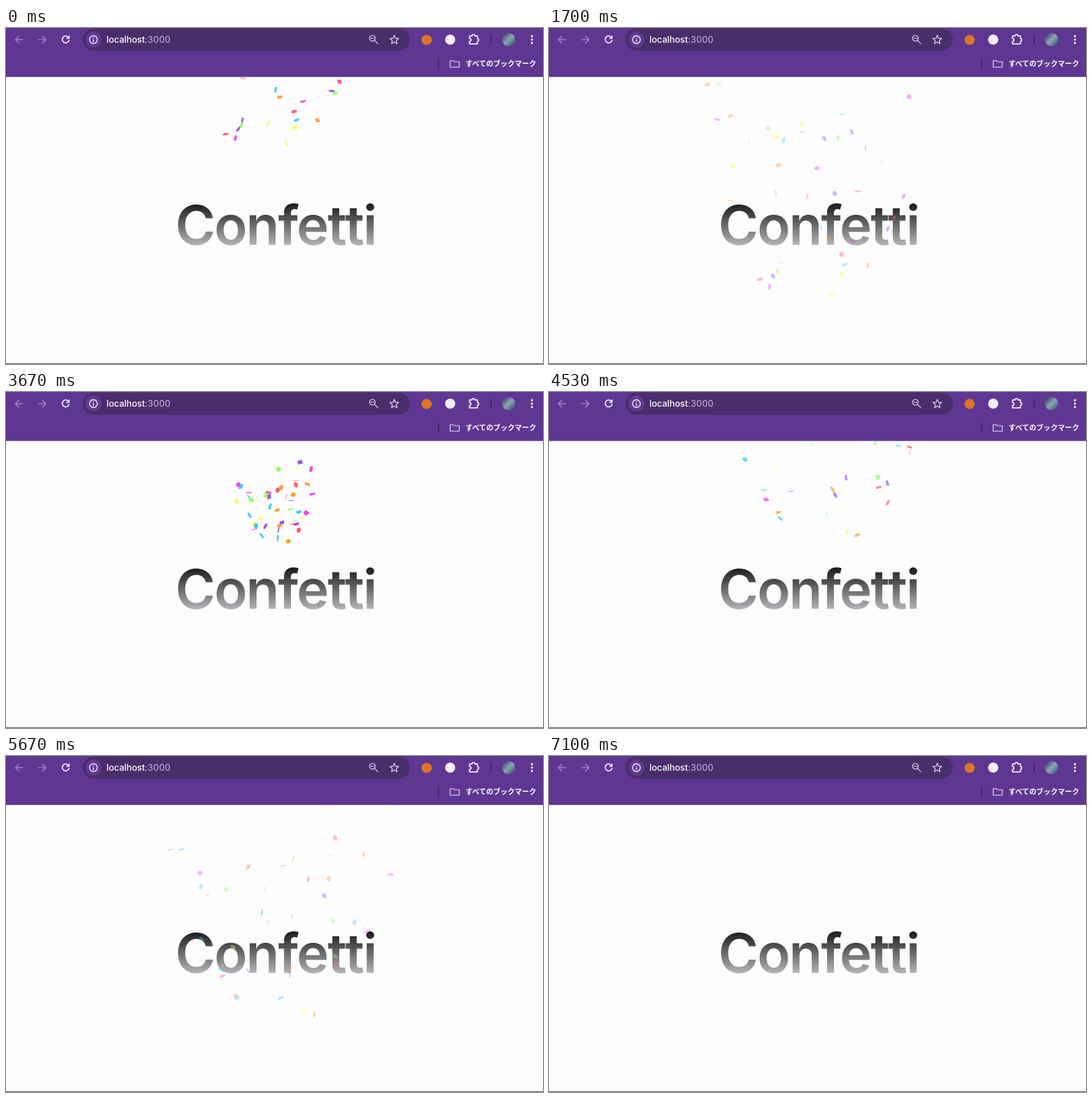
Write an HTML page with a canvas that moves like this. It is 946 px wide and 592 px high and loops after 7.13 s.

```html
<!DOCTYPE html>
<html lang="ja">
<head>
<meta charset="utf-8">
<title>Confetti</title>
<style>
  html, body { margin: 0; width: 100%; height: 100%; overflow: hidden; background: #fdfdfd; }
  svg, canvas { position: absolute; left: 0; top: 0; display: block; }
  .icon { fill: none; stroke: #f4effa; stroke-width: 2; stroke-linecap: round; stroke-linejoin: round; }
  .dim { stroke: #9a7fbe; }
  .soft { stroke: #cfc3de; }
  .thin { stroke-width: 1.7; }
  .url { font: 500 15.6px Inter, "Open Sans", sans-serif; fill: #fff; }
  .port { font-weight: 400; fill: #cbbddd; letter-spacing: .3px; }
  .marks { font: 700 12.6px "Noto Sans CJK JP", "Noto Sans CJK", sans-serif; fill: #fff; }
  .title {
    font: 600 96px Inter, "Liberation Sans", sans-serif;
    font-optical-sizing: none;
    letter-spacing: -2.3px;
    text-anchor: middle;
    fill: url(#fade);
  }
</style>
</head>
<body>
<svg width="946" height="592" viewBox="0 0 946 592">
  <defs>
    <linearGradient id="fade" gradientUnits="userSpaceOnUse" x1="0" y1="310" x2="0" y2="383">
      <stop offset="0" stop-color="#1c1c1e"/>
      <stop offset="1" stop-color="#b3b5b8"/>
    </linearGradient>
    <linearGradient id="avatar" x1="0" y1="0" x2="1" y2="1">
      <stop offset="0" stop-color="#26345c"/>
      <stop offset=".5" stop-color="#8fa3b5"/>
      <stop offset="1" stop-color="#27406f"/>
    </linearGradient>
  </defs>

  <rect width="946" height="87" fill="#cfc5db"/>
  <rect width="946" height="86" fill="#5f3792"/>
  <rect x="135" y="1" width="576.5" height="39" rx="19.5" fill="#4a2d6b"/>
  <circle cx="154" cy="20.5" r="14" fill="#613a94"/>

  <g class="icon">
    <path class="dim" d="M29.5 20.5H17M22.5 14.5L16.5 20.5L22.5 26.5"/>
    <path class="dim" d="M57.5 20.5H70M64.5 14.5L70.5 20.5L64.5 26.5"/>
    <path d="M110.5 17.3A6 6 0 1 0 111 21.7M111 14.2V18.2H107"/>
    <g class="thin">
      <circle cx="154" cy="20.5" r="6.8"/>
      <path d="M154 20.3V23.8M154 17.2V17.3"/>
    </g>
    <g class="soft thin">
      <circle cx="645.5" cy="18" r="5"/>
      <path d="M649.3 21.8L655 27.5M643.3 18H647.7"/>
      <path id="star"/>
      <path d="M782.5 57.5H788L790 59.5H798.5V69H782.5Z"/>
    </g>
    <path d="M816.5 14H821C821 10.8 826 10.8 826 14H830.5V18.5C833.5 18.5 833.5 23.5 830.5 23.5V28H816.5V23.8C820 23.5 820 18.5 816.5 18.2Z"/>
  </g>

  <circle cx="741" cy="21" r="9" fill="#dd7428"/>
  <circle cx="782.5" cy="20.5" r="9" fill="#f4effa"/>
  <circle cx="885.5" cy="20.5" r="11.5" fill="url(#avatar)"/>
  <path d="M854.5 12V29M762 54.5V72" stroke="#3c2260" stroke-width="2"/>
  <path d="M926.5 14.5V27" stroke="#f4effa" stroke-width="3.8" stroke-linecap="round" stroke-dasharray="0 6"/>

  <text class="url" x="177" y="26">localhost<tspan class="port">:3000</tspan></text>
  <text class="marks" x="809.5" y="67">すべてのブックマーク</text>
  <text class="title" x="475" y="381.5">Confetti</text>
  <rect y="590.5" width="946" height="1.5" fill="#77757a"/>
</svg>
<canvas id="stage" width="946" height="592"></canvas>

<script>
const LOOP = 7130, TICK = 1000 / 60, LIFE = 200;
const PIECES = 50, SPEED = 45, SPREAD = Math.PI / 4;
const GRAVITY = 3, DECAY = 0.9;
const ORIGIN = { x: 473, y: 339 };
const COLORS = [
  '60,200,250', '155,85,230', '247,92,122', '145,255,100',
  '253,252,85', '252,158,55', '242,65,245'
];

function seeded(seed) {
  return () => {
    seed = (seed + 0x6D2B79F5) | 0;
    let v = Math.imul(seed ^ (seed >>> 15), seed | 1);
    v ^= v + Math.imul(v ^ (v >>> 7), v | 61);
    return ((v ^ (v >>> 14)) >>> 0) / 4294967296;
  };
}

function makePieces(seed) {
  const rand = seeded(seed);
  return Array.from({ length: PIECES }, (_, i) => {
    const angle = (rand() - 0.5) * SPREAD - Math.PI / 2;
    // Total way a slowing piece covers: the sum of a geometric series.
    const way = SPEED * (0.5 + rand()) / (1 - DECAY);
    return {
      dx: way * Math.cos(angle),
      dy: way * Math.sin(angle),
      rgb: COLORS[i % COLORS.length],
      round: rand() < 0.5,
      wobble: rand() * 10,
      wobbleSpeed: Math.min(0.11, rand() * 0.1 + 0.05),
      tilt: (rand() * 0.5 + 0.25) * Math.PI,
      size: 2 + rand()
    };
  });
}

const bursts = [
  { start: -280, pieces: makePieces(11) },
  { start: 3595, pieces: makePieces(29) }
];

const ctx = document.getElementById('stage').getContext('2d');

function drawPiece(p, tick) {
  const reach = 1 - DECAY ** tick;
  const x = ORIGIN.x + p.dx * reach;
  const y = ORIGIN.y + p.dy * reach + GRAVITY * tick;
  const w = p.wobble + p.wobbleSpeed * tick;
  const wx = 10 * Math.cos(w), wy = 10 * Math.sin(w);

  ctx.fillStyle = `rgba(${p.rgb},${1 - tick / LIFE})`;
  ctx.beginPath();
  if (p.round) {
    ctx.ellipse(x, y, Math.abs(wx) * 0.6, Math.abs(wy) * 0.6, w * Math.PI / 10, 0, Math.PI * 2);
  } else {
    const tilt = p.tilt + 0.1 * tick;
    const tx = p.size * Math.cos(tilt), ty = p.size * Math.sin(tilt);
    const corner = (a, b) => ctx.lineTo(Math.floor(x + a), Math.floor(y + b));
    corner(0, 0);
    corner(wx, ty);
    corner(wx + tx, wy + ty);
    corner(tx, wy);
    ctx.closePath();
  }
  ctx.fill();
}

function draw(time) {
  ctx.clearRect(0, 0, 946, 592);
  ctx.save();
  ctx.beginPath();
  ctx.rect(0, 87, 946, 503.5);
  ctx.clip();
  for (const { start, pieces } of bursts) {
    const tick = Math.floor((time - start) / TICK);
    if (tick > 0 && tick < LIFE) pieces.forEach(p => drawPiece(p, tick));
  }
  ctx.restore();
}

function starPath(cx, cy, outer, inner) {
  let d = '';
  for (let i = 0; i < 10; i++) {
    const r = i % 2 ? inner : outer, a = i * Math.PI / 5 - Math.PI / 2;
    d += `${i ? 'L' : 'M'}${cx + r * Math.cos(a)} ${cy + r * Math.sin(a)}`;
  }
  return d + 'Z';
}
document.getElementById('star').setAttribute('d', starPath(684, 21, 8.3, 3.6));

const began = performance.now();
function frame() {
  draw((performance.now() - began) % LOOP);
  requestAnimationFrame(frame);
}
frame();
</script>
</body>
</html>
```
